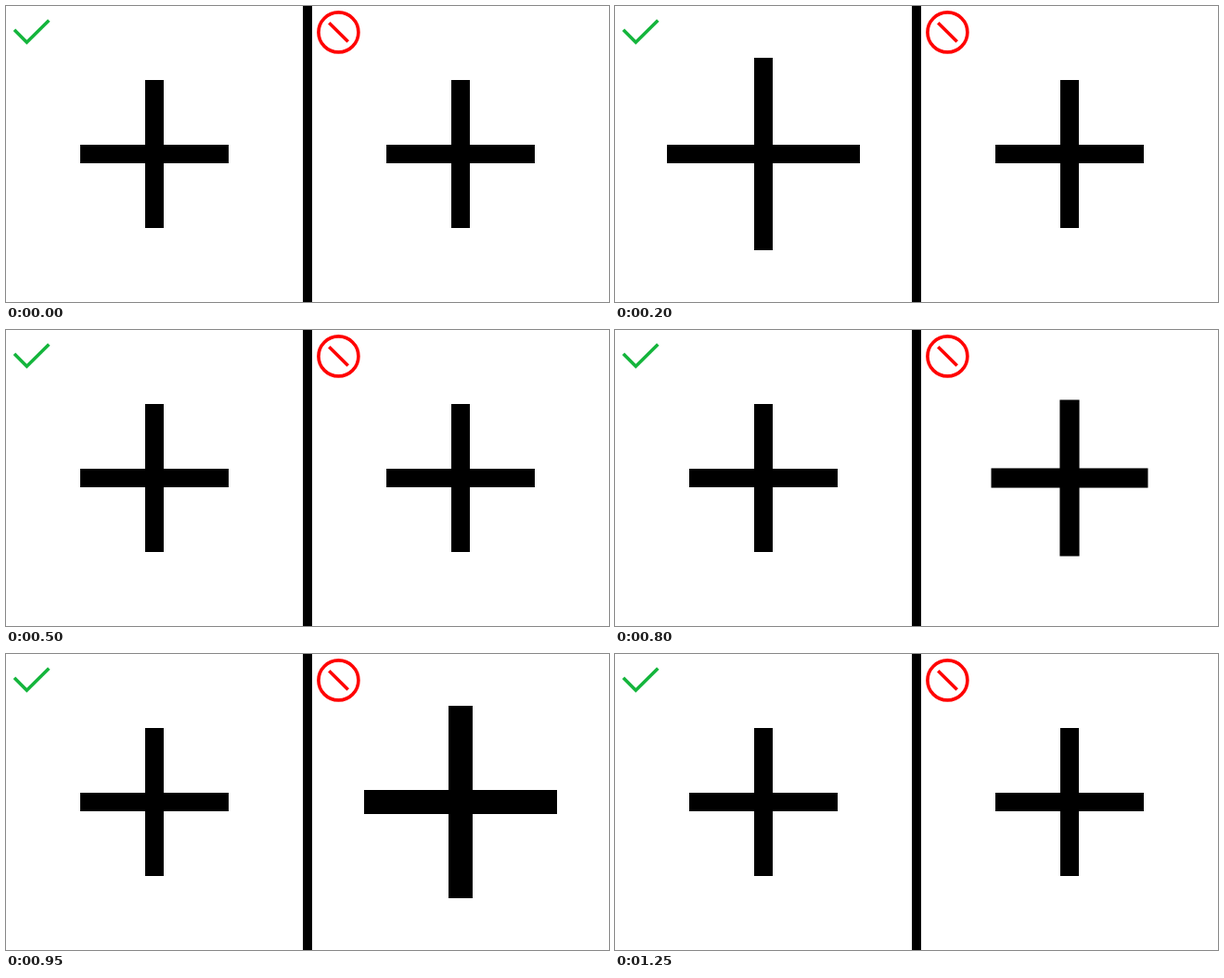
These frames come from a looping animation (650x320 px, 2050 ms). An HTML page with a canvas:

```html
<!DOCTYPE html>
<html lang="en">
<head>
<meta charset="utf-8">
<title>Scaling a plus sign</title>
<style>
html, body { margin: 0; width: 100%; height: 100%; overflow: hidden; background: #fff; }
canvas { display: block; }
</style>
</head>
<body>
<canvas id="stage" width="650" height="320"></canvas>
<script>
const ctx = document.getElementById('stage').getContext('2d');
const LOOP = 2050, TICK = 50, DURATION = 160, GROWTH = 0.3;

// Cubic ease-in-out with control points (0.42, 0) and (0.58, 1).
function easeInOut(x) {
  if (x <= 0) return 0;
  if (x >= 1) return 1;
  let lo = 0, hi = 1;
  for (let i = 0; i < 24; i++) {
    const s = (lo + hi) / 2, r = 1 - s;
    const bx = 3 * s * r * r * 0.42 + 3 * s * s * r * 0.58 + s * s * s;
    if (bx < x) lo = s; else hi = s;
  }
  return lo * lo * (3 - 2 * lo);
}

function pulse(t, grow, shrink) {
  const up = easeInOut((t - grow) / DURATION);
  const down = easeInOut((t - shrink) / DURATION);
  return 1 + GROWTH * (up - down);
}

function plus(cx, cy, half, thick) {
  ctx.fillRect(cx - half, cy - thick / 2, half * 2, thick);
  ctx.fillRect(cx - thick / 2, cy - half, thick, half * 2);
}

function line(color, points) {
  ctx.strokeStyle = color;
  ctx.beginPath();
  points.forEach(([x, y]) => ctx.lineTo(x, y));
  ctx.stroke();
}

function drawIcons() {
  ctx.lineWidth = 3.6;
  line('#14b53c', [[9, 25.8], [22.4, 39.2], [46.3, 15.5]]);
  line('#f00', [[348.3, 18.2], [368.7, 38.6]]);
  ctx.beginPath();
  ctx.arc(358.4, 28.4, 21.5, 0, Math.PI * 2);
  ctx.stroke();
}

function draw(t) {
  ctx.fillStyle = '#fff';
  ctx.fillRect(0, 0, 650, 320);
  ctx.fillStyle = '#000';
  ctx.fillRect(320, 0, 10, 320);
  const left = pulse(t, 2, 338), right = pulse(t, 752, 1088);
  plus(160, 160, 80 * left, 20);
  plus(490, 160, 80 * right, 20 * right);
  drawIcons();
}

const start = performance.now();
function frame() {
  const t = (performance.now() - start) % LOOP;
  draw(Math.floor(t / TICK) * TICK);
  requestAnimationFrame(frame);
}
frame();
</script>
</body>
</html>
```
